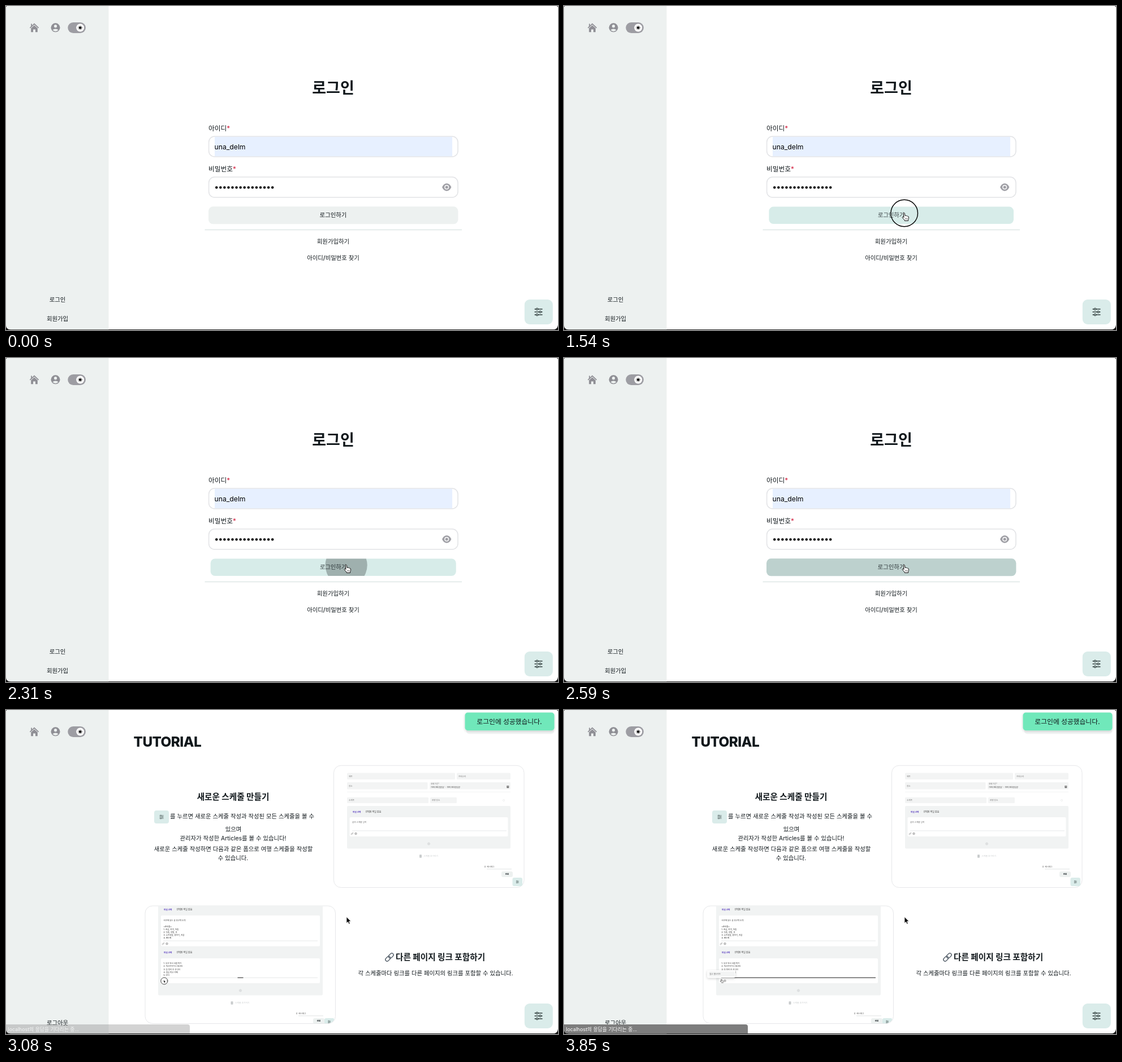
Animation, 976 px wide and 574 px high, one loop 3920 ms. Source, as an HTML page:

```html
<!DOCTYPE html>
<html lang="ko">
<head>
<meta charset="utf-8">
<title>로그인</title>
<style>
html, body { margin: 0; width: 100%; height: 100%; overflow: hidden; background: #141414; }
svg { display: block; width: 976px; height: 574px; }
text { font-family: Inter, "Noto Sans CJK KR", "Noto Sans CJK JP", "Noto Sans CJK", sans-serif; white-space: pre; }
</style>
</head>
<body>
<svg id="stage" viewBox="0 0 976 574" xmlns="http://www.w3.org/2000/svg"></svg>
<script>
const LOOP = 3920, STEP = 70;
const INK = '#11181c', PANEL = '#edf1f0', MINT = '#daecea', GREY = '#8f8f95';

// Markup helpers; text is placed by the middle of its line.
function text(str, x, cy, size, { fill = INK, weight = 400, anchor = 'start', more = '' } = {}) {
  return `<text x="${x}" y="${(cy + size * 0.37).toFixed(2)}" font-size="${size}" fill="${fill}" font-weight="${weight}" text-anchor="${anchor}" ${more}>${str}</text>`;
}
const mid = (str, x, cy, size, weight = 500, fill = INK) => text(str, x, cy, size, { weight, fill, anchor: 'middle' });
const rect = (x, y, w, h, fill, rx = 0, more = '') =>
  `<rect x="${x}" y="${y}" width="${w}" height="${h}" rx="${rx}" fill="${fill}" ${more}/>`;
const line = (x1, x2, y, color, w = 1) =>
  `<path d="M${x1} ${y}H${x2}" stroke="${color}" stroke-width="${w}"/>`;
const dot = (x, y, r, fill, more = '') => `<circle cx="${x}" cy="${y}" r="${r}" fill="${fill}" ${more}/>`;
const group = (id, body, more = '') => `<g id="${id}" ${more}>${body}</g>`;
const at = (x, y, scale, body, turn = 0) => `<g transform="translate(${x} ${y}) rotate(${turn}) scale(${scale})">${body}</g>`;

const sliders = (x, y, scale) => at(x, y, scale, [[-5, 3], [0, -3], [5, 2]].map(([dy, side]) => {
  const knob = side > 0 ? -2.5 : 3;
  return line(-7, 7, dy, '#33403f', 1.3) + dot(knob, dy, 1.7, MINT, 'stroke="#33403f" stroke-width="1.2"');
}).join(''));

const chain = (x, y, scale, color) => at(x, y, scale,
  `<g fill="none" stroke="${color}" stroke-width="1.5"><rect x="-9" y="-3" width="10" height="6" rx="3"/><rect x="-1" y="-3" width="10" height="6" rx="3"/></g>`, -45);

const ARROW = '<path d="M0 0V11.2L2.6 8.8L4.4 12.8L6.3 12L4.6 8.1H8Z" fill="#000" stroke="#fff" stroke-width=".8"/>';
const HAND = `<path d="M-1.9 1.2Q-1.9 0 -.8 0Q.3 0 .4 1.2L.9 5Q2.4 4.2 3.2 5.3Q4.8 4.7 5.4 6Q7.2 5.7 7.4 7.4
  Q7.8 10.6 6.6 12.2V14H.2V12.8Q-2.2 10.8 -3.8 8.2Q-4 6.8 -2.6 6.9L-1 8.2Z" fill="#fff" stroke="#111" stroke-width="1" stroke-linejoin="round"/>
  <path d="M1.6 9V12M3.3 9V12M5 9V12" stroke="#333" stroke-width=".6"/>`;

function shell() {
  const rays = [...Array(8)].map((_, i) => `<path d="M0 -3V-4" transform="rotate(${i * 45})"/>`).join('');
  return rect(0, -10, 976, 583.3, '#fff', 8) + rect(0, 0, 181.5, 574, PANEL)
    + `<path d="M50 30.5L58.2 38.2L57 39.4L50 33L43 39.4L41.8 38.2L46 34.2V31.5H44.2V35.9Z" fill="${GREY}"/>`
    + `<path d="M44.2 39.5L50 34.2L55.8 39.5V46.2H52V41.5H48V46.2H44.2Z" fill="${GREY}"/>`
    + dot(87.5, 38.3, 8, GREY) + dot(87.5, 35.7, 2.6, PANEL)
    + `<path d="M82.4 42.6Q87.5 38.2 92.6 42.6Q87.5 47.4 82.4 42.6Z" fill="${PANEL}"/>`
    + rect(109.3, 29, 31.6, 19, '#9d9da3', 9.5) + dot(131.2, 38.5, 7, '#fff')
    + at(131.2, 38.5, 0.95, dot(0, 0, 2.4, '#000') + `<g stroke="#000" stroke-width="1">${rays}</g>`);
}

function loginPage() {
  const label = (str, cy) => text(`${str}<tspan fill="#d11c3b">*</tspan>`, 358, cy, 11.7);
  const field = y => rect(358.6, y, 440.4, 36, '#fff', 10, 'stroke="#e2e3e6" stroke-width="1.5"');
  const dots = [...Array(15)].map((_, i) => dot(372.2 + i * 7.07, 321.5, 2.2, '#000')).join('');
  return mid('로그인', 91, 520, 10.4) + mid('회원가입', 91, 554, 10.4)
    + mid('로그인', 578.5, 145, 27, 700)
    + label('아이디', 217) + field(231) + rect(369, 231.8, 420, 34.4, '#e7f0ff')
    + text('una_delm', 368.5, 249, 12.2, { fill: '#000' })
    + label('비밀번호', 289) + field(303) + dots
    + '<path d="M771 321Q774 314.3 779.2 314.3T787.4 321Q784.400 327.700 779.2 327.700T771 321Z" fill="#a0a0a6"/>'
    + dot(779.2, 321, 3.3, 'none', 'stroke="#fff" stroke-width="1.4"')
    + group('button', rect(358, 355.3, 441.4, 31, PANEL, 8, 'id="face"')
      + '<g clip-path="url(#buttonClip)">' + dot(602, 367, 0, INK, 'class="ripple"') + dot(602, 367, 0, INK, 'class="ripple"') + '</g>'
      + group('caption', mid('로그인하기', 578.5, 370.5, 10.4)))
    + line(351.5, 806, 396.5, '#dde7e5', 1.4)
    + mid('회원가입하기', 578.5, 417.5, 10.4) + mid('아이디/비밀번호 찾기', 578.5, 445.8, 10.4);
}

const tiny = (str, x, cy, size = 3.6, fill = '#444', weight = 400) => text(str, x, cy, size, { fill, weight });
const FAINT = '#c9cccd';
const picker = (x, cy) => tiny('파일 선택', x, cy, 3.7, '#5b3fc0', 700) + tiny('선택된 파일 없음', x + 22.5, cy, 4, '#333', 500);
const tools = (x, cy) => chain(x + 1, cy, 0.27, '#777') + dot(x + 7.5, cy, 1.7, 'none', 'stroke="#777" stroke-width=".7"') + dot(x + 7.5, cy, .6, '#777');
const plus = (x, y) => dot(x, y, 2, 'none', `stroke="${FAINT}" stroke-width=".7"`) + `<path d="M${x - 1} ${y}h2m-1 -1v2" stroke="${FAINT}" stroke-width=".6"/>`;
const addRow = (x, cy) => rect(x, cy - 2.7, 4, 5.4, FAINT, .8) + tiny('스케줄 추가하기', x + 7.5, cy, 3.8, FAINT);
const footer = (x, y) => tiny('# &#160;해시태그', x, y, 3.6, '#555') + line(x + 4, x + 48, y + 3.8, '#d5d8da', .7)
  + rect(x + 30, y + 8, 20, 10, PANEL, 3) + mid('완료', x + 40, y + 13, 3.5, 700);

function formShot() {
  const box = (x, y, w, h, str) => rect(x, y, w, h, '#f3f4f4', 1.5) + tiny(str, x + 3, y + h / 2, 3.6, '#777');
  return box(603, 111.5, 191, 11.5, '제목') + box(797, 111.5, 95, 11.5, '카테고리')
    + box(603, 128, 142.500, 12.500, '장소') + rect(749, 128, 143, 12.5, '#f3f4f4', 1.5)
    + tiny('여행 기간*', 751.5, 130.8, 3.2, '#666') + tiny('mm/dd/yyyy &#160;- mm/dd/yyyy', 751.5, 136.2, 3.9, '#555')
    + rect(885.3, 134, 4, 4.2, '#777', .6) + line(885.8, 888.8, 135.3, '#fff', .5)
    + line(603, 892, 145.2, '#eff0f1', .8)
    + box(603, 154.8, 144, 10.2, '소제목') + box(750, 154.8, 47, 10.2, '여행 장소')
    + dot(880, 160, 1.6, 'none', 'stroke="#e8eaea" stroke-width=".7"')
    + rect(603, 170, 289, 75.5, '#f1f3f3', 2) + picker(613, 180.500)
    + rect(607.5, 190, 280, 34, '#fff', 2) + tiny('글과 스케줄 입력', 612, 199, 3.6, '#666')
    + line(612, 885, 214, '#dcdfe0', .7) + tools(611, 219) + plus(747.5, 237)
    + addRow(731, 259) + footer(846, 278)
    + rect(895.5, 297, 17.5, 15, MINT, 3) + sliders(904.2, 304.5, 0.34);
}

function noteShot() {
  const lines = (rows, y) => rows.map((s, i) => tiny(s, 278.5, y + i * 5.1, 3.5, '#333', 500)).join('');
  return rect(269, 340, 291, 165.5, '#f1f3f3', 2)
    + picker(279, 354) + rect(274, 364, 281, 54.5, '#fff', 2)
    + tiny('사진에 있는 뷰 부산역 도착', 278.5, 373, 3.5, '#333', 500)
    + lines(['&lt;준비물&gt;', '1. 현금, 지역, 차림', '2. 칫솔, 양말, 옷', '3. 노트북들, 충전기, 지갑', '4. 핸드백'], 383.3)
    + line(278, 551, 409, '#dcdfe0', .7) + tools(277, 414)
    + picker(279, 430) + rect(274, 440, 281, 44, '#fff', 2)
    + lines(['1. 부산 와서 국밥 먹기', '2. 게스트하우스 체크인', '3. 짐 정리 후 휴식타', '4. 점심 먹고 카페', '5. 바다'], 449)
    + line(278, 551, 474.3, '#dcdfe0', .7) + '<path id="underline" stroke="#222" stroke-width="1.1"/>'
    + tools(277, 479.7) + plus(414.5, 497) + addRow(397.5, 519) + footer(513, 538)
    + rect(563, 546, 17.5, 15, MINT, 3) + sliders(571.5, 552.5, 0.34)
    + group('popover', rect(253, 461, 50, 13.5, '#fcfcfc', 3, 'filter="url(#soft)"')
      + rect(256, 463.5, 46, 8.500, '#f3f4f4', 2) + tiny('참고 웹사이트', 257.5, 467.7, 3.4, '#666') + at(278.5, 477, 0.45, HAND))
    + group('miniRing', dot(279.8, 480, 6, '#fff', 'fill-opacity=".7" stroke="#333" stroke-width=".9"') + at(279, 478.5, 0.4, ARROW));
}

function tutorialPage() {
  const card = (x, y, w, h) => rect(x, y, w, h, '#fff', 13, 'stroke="#e6e7e9" stroke-width="1"');
  return mid('로그아웃', 91, 554, 10.4)
    + text('TUTORIAL', 225.5, 55.700, 24.3, { weight: 800, more: 'letter-spacing="-.55"' })
    + mid('새로운 스케줄 만들기', 401.5, 154, 14.6, 700)
    + rect(262, 178, 26, 23, MINT, 4) + sliders(275, 189.500, 0.52)
    + text('를 누르면 새로운 스케줄 작성과 작성된 모든 스케줄을 볼 수', 290, 188, 10.36)
    + mid('있으며', 402, 211, 10.36, 400) + mid('관리자가 작성한 Articles를 볼 수 있습니다!', 401.5, 227, 10.36, 400)
    + mid('새로운 스케줄 작성하면 다음과 같은 폼으로 여행 스케줄을 작성할', 402, 246, 10.36, 400)
    + mid('수 있습니다.', 401.5, 262, 10.36, 400)
    + chain(678, 438, 0.98, '#5c6670') + text('다른 페이지 링크 포함하기', 689, 438, 14.6, { weight: 700 })
    + mid('각 스케줄마다 링크를 다른 페이지의 링크를 포함할 수 있습니다.', 759.5, 466.5, 10.36, 400)
    + card(579.5, 98.3, 336.500, 216.2) + card(246, 347, 336.5, 208.5)
    + group('shots', formShot() + `<g clip-path="url(#noteClip)">${noteShot()}</g>`);
}

const toast = rect(814, 30, 155, 12.5, '#f3f5f5', 5) + rect(811.500, 4.5, 158, 31.7, '#6fe8ba', 5, 'filter="url(#soft)"')
  + mid('로그인에 성공했습니다.', 890, 20.2, 11.8);
const status = '<path d="M0 557H321Q325 557 325 561V574H0Z" fill="#7d7d7d"/>'
  + text('localhost의 응답을 기다리는 중...', 3.5, 565.6, 8.8, { fill: '#fff' });

const stage = document.getElementById('stage');
stage.innerHTML = `<defs>
  <clipPath id="window"><path d="M0 3Q0 0 3 0H973Q976 0 976 3V565Q976 573.2 968 573.2H8Q0 573.2 0 565Z"/></clipPath>
  <clipPath id="buttonClip">${rect(358, 355.3, 441.4, 31, '#000', 8)}</clipPath>
  <clipPath id="noteClip">${rect(246.500, 347.5, 335.5, 207.5, '#000', 12.5)}</clipPath>
  <filter id="soft" x="-20%" y="-40%" width="140%" height="200%"><feDropShadow dx="0" dy="1.5" stdDeviation="2" flood-opacity=".18"/></filter>
  </defs>` + rect(0, 0, 976, 574, '#141414')
  + '<g clip-path="url(#window)">' + shell() + group('login', loginPage()) + group('tutorial', tutorialPage())
  + rect(916.8, 520, 50, 44, MINT, 9) + sliders(941.5, 542, 1)
  + group('toast', toast) + group('status', status) + '</g>'
  + dot(601.7, 367, 23.8, 'none', 'id="ring" stroke="#000" stroke-width="1.4"')
  + group('cursor', group('arrow', ARROW) + group('hand', HAND));

const el = Object.fromEntries([...stage.querySelectorAll('[id]')].map(n => [n.id, n]));
const ripples = [...stage.querySelectorAll('.ripple')];

const clamp = v => Math.min(1, Math.max(0, v));
const ramp = (t, from, to) => clamp((t - from) / (to - from));
const smooth = p => p * p * (3 - 2 * p);
const within = (t, a, b) => t >= a && t < b;
const show = (node, on) => node.setAttribute('display', on ? 'inline' : 'none');

function track(keys, t) {
  if (t <= keys[0][0]) return keys[0][1];
  for (let i = 1; i < keys.length; i++) {
    const [t0, a] = keys[i - 1], [t1, b] = keys[i];
    if (t <= t1) return a + (b - a) * (t - t0) / (t1 - t0);
  }
  return keys[keys.length - 1][1];
}

const cursorX = [[70, 520], [350, 600], [420, 603], [560, 593.5], [1050, 595], [1260, 602]];
const cursorY = [[70, 572], [350, 366], [420, 361], [560, 378.300], [1050, 376], [1260, 366.5]];
const pressScale = [[1400, 1], [1540, .98], [1610, .975], [1820, 1], [2100, 1], [2240, .975], [2450, 1]];
const rippleStarts = [1527, 2175];
const mix = (a, b, p) => `rgb(${a.map((v, i) => Math.round(v + (b[i] - v) * p))})`;

function draw(time) {
  const t = Math.floor((time % LOOP) / STEP) * STEP;
  const inside = t >= 2660;
  show(el.login, !inside);
  show(el.tutorial, inside);
  show(el.toast, inside);

  const hover = ramp(t, 1330, 1540);
  const s = track(pressScale, t);
  el.face.setAttribute('fill', mix([237, 241, 240], [215, 236, 233], hover));
  el.caption.setAttribute('opacity', 1 - .2 * hover);
  el.button.setAttribute('transform', `translate(578.7 370.8) scale(${s}) translate(-578.7 -370.8)`);
  ripples.forEach((node, i) => {
    const p = smooth(ramp(t, rippleStarts[i], rippleStarts[i] + 750));
    node.setAttribute('r', 441 * p);
    node.setAttribute('opacity', .31 * (1 - p));
  });
  show(el.ring, within(t, 1470, 1610) || within(t, 2100, 2240));

  const pointing = within(t, 1190, 2660);
  show(el.cursor, t >= 70);
  show(el.hand, pointing);
  show(el.arrow, !pointing);
  el.cursor.setAttribute('transform', `translate(${track(cursorX, t)} ${track(cursorY, t)})`);

  show(el.shots, t >= 2870);
  const half = track([[3073, 0], [3080, 5], [3220, 136.5]], t);
  el.underline.setAttribute('d', half ? `M${414.5 - half} 474.3H${414.5 + half}` : '');
  show(el.miniRing, within(t, 3010, 3220));
  show(el.popover, t >= 3430);
  el.popover.setAttribute('opacity', ramp(t, 3360, 3570));
  el.status.setAttribute('opacity', ramp(t, 3010, 3220));
}

const start = performance.now();
function tick() {
  draw(performance.now() - start);
  requestAnimationFrame(tick);
}
tick();
</script>
</body>
</html>
```
